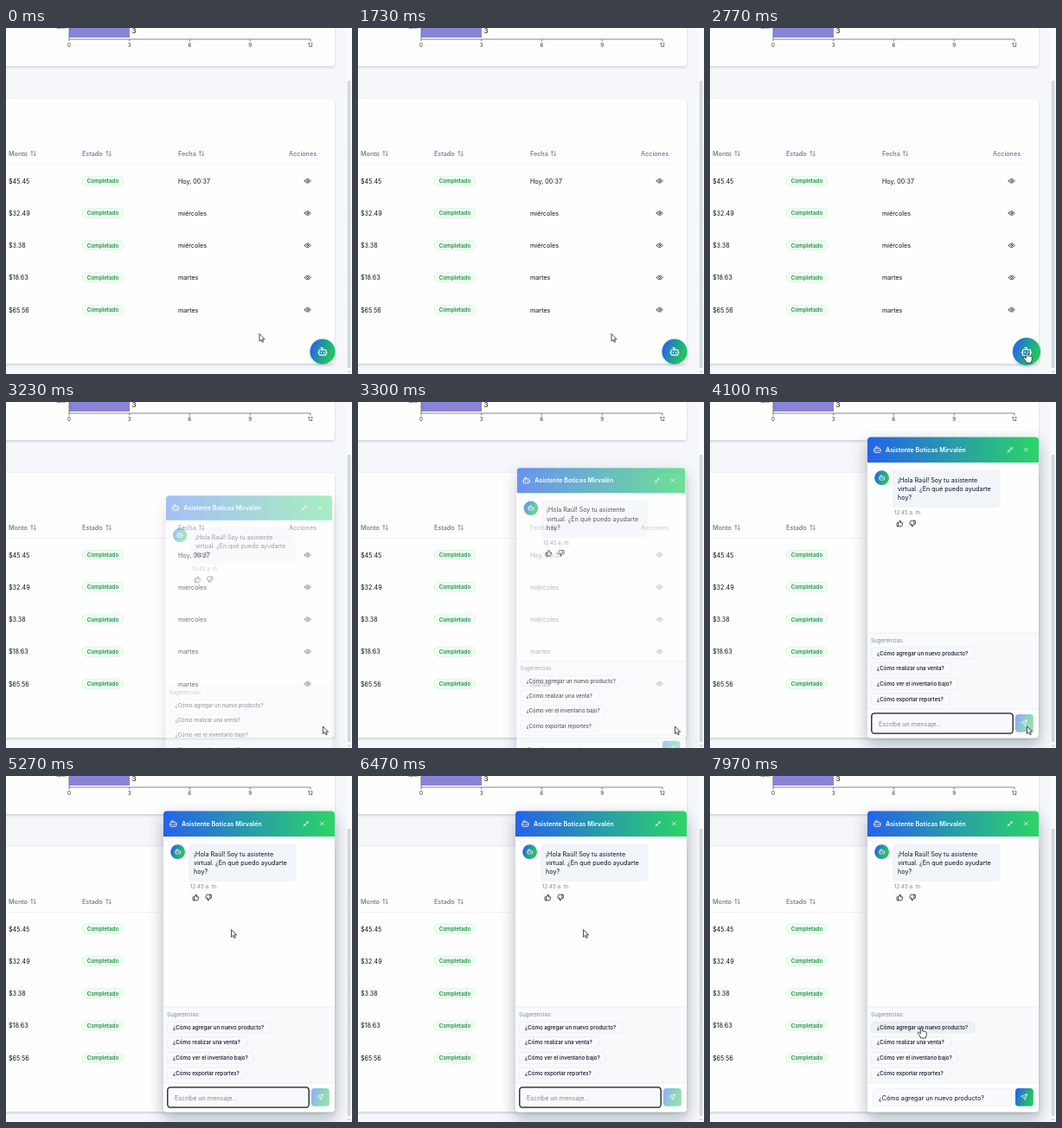
An HTML page for the animation above (8 s loop, 400x400 px).

```html
<!DOCTYPE html>
<html lang="es">
<head>
<meta charset="utf-8">
<style>
  html, body { margin: 0; width: 100%; height: 100%; overflow: hidden; background: #f5f7fa; }
  svg { display: block; width: 100vw; height: 100vh; font: 7.2px Inter, sans-serif; fill: #0b1120; }
  symbol { fill: none; stroke: currentColor; stroke-width: 2; stroke-linecap: round; stroke-linejoin: round; overflow: visible; }
  .small { font-size: 6.2px; }
  .head { fill: #64748b; color: #64748b; font-weight: 500; }
  .muted { fill: #7c8798; }
  .badge { font-size: 6.2px; font-weight: 600; fill: #16923f; }
  .chip { font-size: 6.15px; font-weight: 500; }
  .white { color: #fff; fill: #fff; }
  .card { fill: #fefefe; filter: url(#cardShadow); }
</style>
</head>
<body>
<svg viewBox="0 0 400 400" xmlns="http://www.w3.org/2000/svg">
  <defs>
    <linearGradient id="brand"><stop stop-color="#2563eb"/><stop offset="1" stop-color="#2bd566"/></linearGradient>
    <linearGradient id="round" x2="1" y2=".35"><stop offset=".1" stop-color="#2563eb"/><stop offset=".95" stop-color="#22c55e"/></linearGradient>
    <filter id="cardShadow" x="-10%" y="-10%" width="120%" height="125%"><feDropShadow dx="0" dy="1.5" stdDeviation="1.6" flood-color="#0f172a" flood-opacity=".17"/></filter>
    <filter id="panelShadow" x="-25%" y="-15%" width="150%" height="135%"><feDropShadow dx="0" dy="7" stdDeviation="9" flood-color="#0f172a" flood-opacity=".3"/></filter>
    <clipPath id="panelClip"><rect x="182" y="40.5" width="198" height="348" rx="4"/></clipPath>

    <symbol id="sort" viewBox="0 0 24 24"><path d="m21 16-4 4-4-4M17 20V4M3 8l4-4 4 4M7 4v16"/></symbol>
    <symbol id="eye" viewBox="0 0 24 24"><path d="M2 12C6 3 18 3 22 12 18 21 6 21 2 12Z"/><circle cx="12" cy="12" r="3"/></symbol>
    <symbol id="bot" viewBox="0 0 24 24"><path d="M12 8V4H8M2 14h2M20 14h2M15 13v2M9 13v2"/><rect x="4" y="8" width="16" height="12" rx="2"/></symbol>
    <symbol id="thumb" viewBox="0 0 24 24"><path d="M7 10v12M15 5.9 14 10h5.8a2 2 0 0 1 2 2.6l-2.4 8a2 2 0 0 1-1.9 1.4H4a2 2 0 0 1-2-2v-8a2 2 0 0 1 2-2h2.8a2 2 0 0 0 1.8-1.1L12 2a3.1 3.1 0 0 1 3 3.9Z"/></symbol>
    <symbol id="shrink" viewBox="0 0 24 24"><path d="M4 14h6v6M20 10h-6V4M14 10l7-7M3 21l7-7"/></symbol>
    <symbol id="close" viewBox="0 0 24 24"><path d="M18 6 6 18M6 6l12 12"/></symbol>
    <symbol id="plane" viewBox="0 0 24 24"><path d="M21.8 2.2 14.5 21.5 10.5 13.5 2.5 9.5ZM21.8 2.2 10.5 13.5"/></symbol>
  </defs>

  <rect width="400" height="400" fill="#f5f7fa"/>
  <rect class="card" x="-20" y="-30" width="400" height="74" rx="4"/>
  <rect class="card" x="-20" y="82" width="400" height="306" rx="4"/>

  <path d="M73 0h70v11H73Z" fill="#8884d8"/>
  <text x="145.5" y="6.3" font-size="8.2">3</text>
  <text class="small" x="69" y="1.4" text-anchor="end">10m</text>
  <g id="axis" class="small" text-anchor="middle" fill="#333"><path d="M73 0V13H352" fill="none" stroke="#666" stroke-width=".8"/></g>

  <g id="table"><path d="M0 157.5H367" stroke="#eef1f5" stroke-width=".7"/></g>

  <rect x="393" width="7" height="400" fill="#f8fafb"/>
  <rect x="394.8" y="61" width="3.6" height="332" fill="#cfd8e1"/>
  <path d="m395 396.5 1.6 1.6 1.6-1.6" fill="none" stroke="#8a949f" stroke-width=".8"/>

  <g id="launcher" class="white">
    <circle r="14.6" fill="url(#round)" filter="url(#cardShadow)"/>
    <use href="#bot" x="-6.2" y="-6.2" width="12.4" height="12.4"/>
  </g>

  <g id="panel">
    <rect x="182" y="40.5" width="198" height="348" rx="4" fill="#fefefe" filter="url(#panelShadow)"/>
    <g clip-path="url(#panelClip)">
      <path d="M182 40h198v30H182Z" fill="url(#brand)"/>
      <path d="M182 267h198v88H182Z" fill="#f8fafc"/>
      <path d="M182 267h198M182 355h198" stroke="#e2e8f0" stroke-width=".7"/>
    </g>
    <g class="white">
      <use href="#bot" x="188.3" y="50" width="10" height="10"/>
      <text x="203" y="57.8" font-weight="600">Asistente Boticas Mirvalén</text>
      <use href="#shrink" x="342.8" y="51" width="8.2" height="8.2"/>
      <use href="#close" x="361.2" y="51" width="8.2" height="8.2"/>
      <circle cx="198.6" cy="87.7" r="8.4" fill="url(#round)"/>
      <use href="#bot" x="194.5" y="83.4" width="8.2" height="8.2"/>
    </g>
    <rect x="211" y="78.5" width="124.5" height="43.5" rx="4" fill="#f1f5f9"/>
    <text x="217" y="92.5">¡Hola Raúl! Soy tu asistente</text>
    <text x="217" y="102.8">virtual. ¿En qué puedo ayudarte</text>
    <text x="217" y="113.1">hoy?</text>
    <text class="small muted" x="213" y="130.2">12:45 a. m.</text>
    <use href="#thumb" x="215.3" y="136.3" width="8.2" height="8.2"/>
    <use href="#thumb" transform="translate(238.3 144.7) rotate(180)" width="8.2" height="8.2"/>
    <text class="small muted" x="186" y="277.8">Sugerencias:</text>
    <g id="chips"></g>
    <rect id="field" rx="3.5"/>
    <text id="message" x="195" y="374.5"></text>
    <g id="send" class="white">
      <rect x="353" y="361" width="20.8" height="20.8" rx="3.5" fill="url(#round)"/>
      <use href="#plane" x="359.2" y="367.2" width="8.2" height="8.2"/>
    </g>
  </g>

  <g id="cursor" fill="#fff" stroke="#1f2328" stroke-width=".8" stroke-linejoin="round">
    <path id="arrow" d="M0 0V8.6L2 6.8 3.4 9.8 4.8 9.1 3.4 6.2H6.1Z"/>
    <path id="hand" d="M-1.2 .9C-1.2-.4 .8-.4 .8 .9V4.2C1.1 3.3 2.5 3.4 2.6 4.5 3 3.7 4.2 3.9 4.3 5 4.8 4.3 5.8 4.6 5.8 5.7V8.3C5.8 9.6 4.8 10.4 4.8 12H-.8C-.8 10.7-2.3 9.4-3.2 7.8L-4.3 6.2C-4.6 5.2-3.3 4.7-2.5 5.6L-1.2 7Z"/>
  </g>
</svg>

<script>
const $ = id => document.getElementById(id);
const add = (id, markup) => $(id).insertAdjacentHTML('beforeend', markup);
const show = (id, on) => $(id).setAttribute('visibility', on ? 'visible' : 'hidden');
const setAll = (id, attrs) => Object.entries(attrs).forEach(([k, v]) => $(id).setAttribute(k, v));

[0, 3, 6, 9, 12].forEach(n => {
  const x = 73 + n * 23.25;
  add('axis', `<path d="M${x} 13v2.6" stroke="#666" stroke-width=".8"/><text x="${x}" y="21.7">${n}</text>`);
});

[['Monto', 3, 27.5], ['Estado', 88, 114.5], ['Fecha', 199, 222]].forEach(([label, x, iconX]) =>
  add('table', `<g class="head"><text x="${x}" y="147.8">${label}</text><use href="#sort" x="${iconX}" y="141" width="8.2" height="8.2"/></g>`));
add('table', '<text class="head" x="359" y="147.8" text-anchor="end">Acciones</text>');

[['$45.45', 'Hoy, 00:37'], ['$32.49', 'miércoles'], ['$3.38', 'miércoles'], ['$18.63', 'martes'], ['$65.56', 'martes']]
  .forEach(([amount, date], i) => add('table', `<g transform="translate(0 ${176.8 + i * 37.25})">
    <text x="3" y="2.7">${amount}</text>
    <rect x="88" y="-5.5" width="48" height="11" rx="5.5" fill="#f0fdf4" stroke="#c5f3d4" stroke-width=".6"/>
    <text class="badge" x="112" y="2.2" text-anchor="middle">Completado</text>
    <text x="199" y="2.7">${date}</text>
    <use href="#eye" x="344.6" y="-4.1" width="8.2" height="8.2"/></g>`));

const QUESTIONS = ['¿Cómo agregar un nuevo producto?', '¿Cómo realizar una venta?', '¿Cómo ver el inventario bajo?', '¿Cómo exportar reportes?'];
const CHIP_WIDTHS = [119.5, 91.5, 100, 91];
QUESTIONS.forEach((q, i) => {
  const y = 284 + i * 17.6;
  add('chips', `<rect id="chip${i}" x="186.5" y="${y}" width="${CHIP_WIDTHS[i]}" height="13" rx="3.5" fill="#f8fafc" stroke="#e2e8f0" stroke-width=".6"/>
    <text class="chip" x="193" y="${y + 8.8}">${q}</text>`);
});

const span = (t, a, b) => Math.min(1, Math.max(0, (t - a) / (b - a)));
const smooth = p => p * p * (3 - 2 * p);
const easeOut = p => 1 - (1 - p) ** 1.65;

// Cursor moves: start, end, target x, target y
const MOVES = [[2300, 2640, 366.5, 375], [4570, 4800, 260.5, 177.5], [6800, 7130, 244.5, 291]];

function cursorAt(t) {
  let x = 293, y = 353.5;
  for (const [a, b, toX, toY] of MOVES) {
    const p = smooth(span(t, a, b));
    x += (toX - x) * p;
    y += (toY - y) * p;
  }
  return [x, y];
}

function draw(t) {
  const [x, y] = cursorAt(t);
  const opened = t >= 3150;
  const onLauncher = !opened && Math.hypot(x - 366, y - 374) < 14.6;
  const onChip = t > 6800 && y > 284;
  setAll('cursor', { transform: `translate(${x} ${y})` });
  show('hand', onLauncher || onChip);
  show('arrow', !onLauncher && !onChip);

  const grow = 1 + .1 * smooth(span(t, 2540, 2740));
  setAll('launcher', { transform: `translate(366 374) scale(${grow})` });
  show('launcher', !opened);

  const p = easeOut(span(t, 3150, 3450));
  setAll('panel', {
    opacity: p,
    transform: `translate(281 ${214 + 105 * (1 - p)}) scale(${.95 + .05 * p}) translate(-281 -214)`
  });
  show('panel', opened);
  setAll('chip0', { fill: onChip ? '#edf1f6' : '#f8fafc' });

  const filled = t >= 7970;
  const focused = t >= 3450 && !filled;
  setAll('field', focused
    ? { x: 186.8, y: 359.8, width: 163.4, height: 23.4, fill: '#f8fafc', stroke: '#111827', 'stroke-width': 1.3 }
    : { x: 188.3, y: 361.3, width: 160.4, height: 20.4, fill: '#f8fafc', stroke: '#e2e8f0', 'stroke-width': .6 });
  $('message').textContent = filled ? QUESTIONS[0] : 'Escribe un mensaje...';
  setAll('message', { class: filled ? '' : 'muted' });
  setAll('send', { opacity: filled ? 1 : .5 });
}

function tick() {
  draw(performance.now() % 8000);
  requestAnimationFrame(tick);
}
tick();
</script>
</body>
</html>
```
